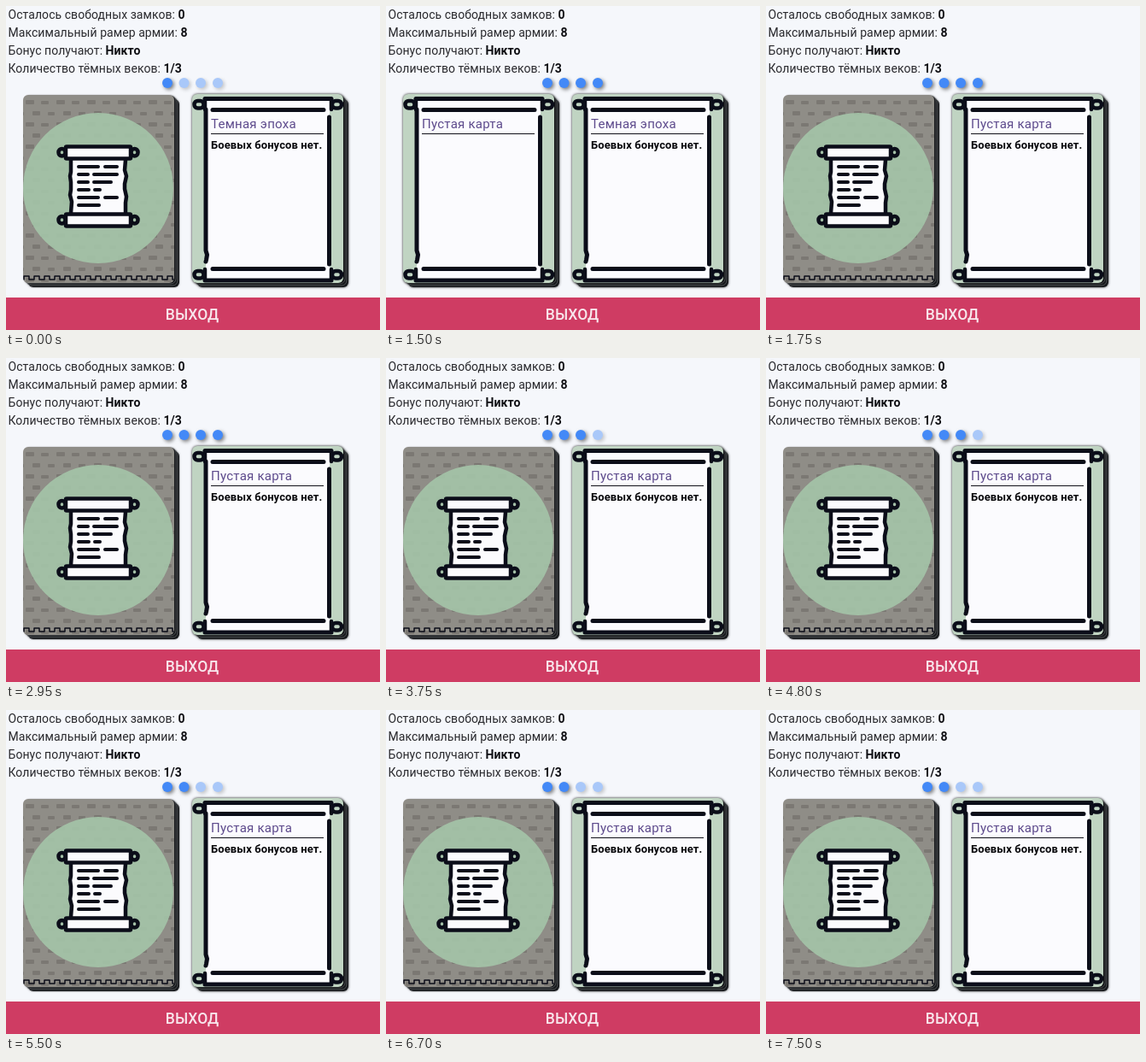
Animation of 438x379 px, one loop 8 s. Source, as an HTML page:

```html
<!DOCTYPE html>
<html lang="ru">
<head>
<meta charset="utf-8">
<title>Карты</title>
<style>
  html, body { margin: 0; width: 100%; height: 100%; overflow: hidden; background: #f5f7fb; }
  svg { display: block; width: 438px; height: 379px; font-family: Roboto, "Open Sans", sans-serif; }
  .info { font-size: 14px; letter-spacing: .06px; fill: #2a2a2e; }
  .info tspan { font-weight: 700; fill: #101014; }
  .title { font-size: 15px; letter-spacing: .25px; fill: #5d4a8c; }
  .note { font-size: 13px; font-weight: 700; letter-spacing: .1px; fill: #08080c; }
  .exit { font-size: 17.5px; font-weight: 500; fill: #f8e6ec; text-anchor: middle; }
  .ink { fill: none; stroke: #0b0d19; stroke-linecap: round; stroke-linejoin: round; }
  .dot { fill: #4389f7; filter: drop-shadow(2px 2px 2px rgba(0, 0, 0, .5)); }
  .soft { filter: drop-shadow(0 0 1px rgba(0, 0, 0, .5)); }
  .deep { filter: drop-shadow(0 0 1.5px rgba(0, 0, 0, .8)); }
</style>
</head>
<body>
<svg viewBox="0 0 438 379">
  <defs>
    <pattern id="bricks" width="36" height="26" patternUnits="userSpaceOnUse" x="22" y="108">
      <g fill="#7b7873">
        <rect x="1" y="2" width="10" height="5" rx="1"/>
        <rect x="19" y="3" width="9" height="4" rx="1"/>
        <rect x="9" y="15" width="9" height="5" rx="1"/>
        <rect x="27" y="16" width="8" height="4" rx="1"/>
      </g>
    </pattern>
    <clipPath id="cardClip"><rect x="20" y="104" width="177" height="220" rx="6"/></clipPath>

    <g id="stack" fill="#17191c">
      <rect x="26" y="109" width="177" height="220" rx="6"/>
      <rect x="24" y="107" width="177" height="220" rx="6" stroke="#6c6f72" stroke-width=".6"/>
      <rect x="22" y="105" width="177" height="220" rx="6" stroke="#6c6f72" stroke-width=".6"/>
    </g>

    <g id="back">
      <use href="#stack" class="soft"/>
      <g clip-path="url(#cardClip)">
        <rect x="20" y="104" width="177" height="220" fill="#8f8d87"/>
        <rect x="20" y="104" width="177" height="220" fill="url(#bricks)"/>
        <circle cx="108" cy="213" r="88" fill="#a6c6aa" fill-opacity=".88"/>
        <path id="wall" class="ink" stroke-width="1.5"/>
      </g>
      <path d="M76 176H141L139 192L142 200L139 212L142 226L140 245H76L78 232L75 220L77 206L74 198Z" fill="#fbfbfd"/>
      <g class="ink" stroke-width="4.500">
        <path d="M76 180V194L75 199L76 206V215L75 221L77 229L76 242"/>
        <path d="M140 180L139 192L141 199L139 208V214L141 223L140 230V242"/>
        <path id="lines" stroke-width="4"/>
        <g id="rod">
          <rect x="61.500" y="167" width="8" height="8.500" rx="4" fill="#a3bfa6"/>
          <rect x="146.500" y="167" width="8" height="8.500" rx="4" fill="#a3bfa6"/>
          <rect x="70" y="164.500" width="76" height="14" rx="1" fill="#fbfbfd"/>
        </g>
        <use href="#rod" y="79"/>
      </g>
    </g>

    <g id="front">
      <use href="#stack" class="deep"/>
      <rect x="20" y="103" width="177" height="221" rx="6" fill="#c0d4c2" class="deep"/>
      <path d="M35 107H183V123H181V306H183V323H35V306H36V123H35Z" fill="#fbfbfe"/>
      <g class="ink" stroke-width="5">
        <path d="M36 121V286L37.500 291L36.500 297L36 299"/>
        <path d="M180.500 130V302"/>
        <path d="M35 108.500H183M44 121.500H174"/>
        <path d="M44 307.500H174M35 321H183"/>
        <g id="knobs" stroke-width="4.500">
          <path d="M35 109V121M183 109V121"/>
          <rect x="22.500" y="111" width="11" height="8.500" rx="4" fill="#c0d4c2"/>
          <rect x="184" y="111" width="11" height="8.500" rx="4" fill="#c0d4c2"/>
        </g>
        <use href="#knobs" y="199"/>
      </g>
      <path d="M42 149.500H174" stroke="#101018"/>
    </g>
  </defs>

  <rect width="438" height="379" fill="#f5f7fb"/>
  <g class="info">
    <text x="2.500" y="15">Осталось свободных замков: <tspan>0</tspan></text>
    <text x="2.500" y="36">Максимальный рамер армии: <tspan>8</tspan></text>
    <text x="2.500" y="57">Бонус получают: <tspan>Никто</tspan></text>
    <text x="2.500" y="78">Количество тёмных веков: <tspan>1/3</tspan></text>
  </g>
  <g id="dots"></g>

  <use id="leftBack" href="#back"/>
  <g id="leftFront">
    <use href="#front"/>
    <text class="title" x="42" y="143">Пустая карта</text>
  </g>

  <g transform="translate(198)">
    <use href="#front"/>
    <text id="rightTitle" class="title" x="42" y="143"></text>
    <text class="note" x="42" y="167">Боевых бонусов нет.</text>
  </g>

  <rect y="341" width="438" height="38" fill="#cf3c63"/>
  <text class="exit" x="218" y="367">ВЫХОД</text>
</svg>
<script>
  const LOOP = 8000;
  const AGE = 'Темная эпоха', BLANK = 'Пустая карта';
  const steps = [
    { at: 0, lit: 1, open: false, title: AGE },
    { at: 1500, lit: 4, open: true, title: AGE },
    { at: 1750, lit: 4, open: false, title: BLANK },
    { at: 3750, lit: 3, open: false, title: BLANK },
    { at: 5500, lit: 2, open: false, title: BLANK }
  ];
  const $ = id => document.getElementById(id);

  // Battlement line along the foot of the card back
  let wall = 'M18 320';
  for (let x = 18; x < 198; x += 12) wall += 'h3v-4h6v4h3';
  $('wall').setAttribute('d', wall);

  // Writing on the small scroll: [start, end] pairs per row
  const rows = [[85, 108, 116, 130], [85, 96, 103, 130], [85, 96, 103, 123],
                [85, 97, 104, 110], [85, 108, 116, 130], [85, 109]];
  $('lines').setAttribute('d', rows.map((row, i) => {
    let d = '';
    for (let k = 0; k < row.length; k += 2) d += `M${row[k]} ${188 + i * 9}H${row[k + 1]}`;
    return d;
  }).join(''));

  const dots = [189, 208.5, 228, 248].map(cx => {
    const dot = document.createElementNS('http://www.w3.org/2000/svg', 'circle');
    dot.setAttribute('cx', cx);
    dot.setAttribute('cy', 90);
    dot.setAttribute('r', 6);
    dot.setAttribute('class', 'dot');
    return $('dots').appendChild(dot);
  });

  let shown = null;
  function show(step) {
    if (step === shown) return;
    shown = step;
    dots.forEach((dot, i) => { dot.style.opacity = i < step.lit ? 1 : .42; });
    $('leftBack').style.display = step.open ? 'none' : '';
    $('leftFront').style.display = step.open ? '' : 'none';
    $('rightTitle').textContent = step.title;
  }

  const start = performance.now();
  function tick(now) {
    const t = Math.max(0, now - start) % LOOP;
    show(steps.filter(s => s.at <= t).pop());
    requestAnimationFrame(tick);
  }
  show(steps[0]);
  requestAnimationFrame(tick);
</script>
</body>
</html>
```
